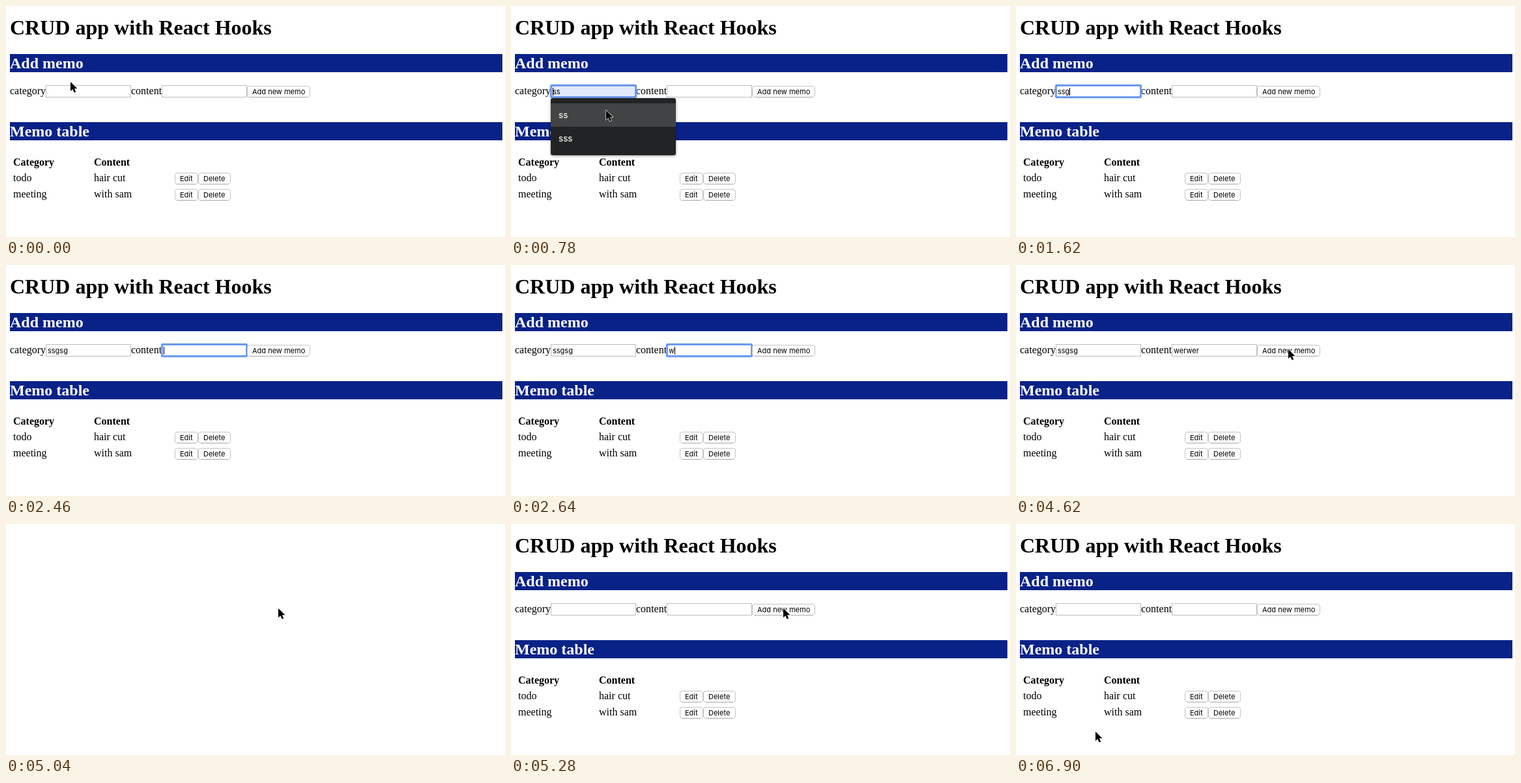
An HTML page that plays this animation: 766 by 356 pixels, repeating every 6.96 s.

```html
<!DOCTYPE html>
<html lang="en">
<head>
<meta charset="utf-8">
<title>CRUD app</title>
<style>
  html, body { margin: 0; width: 100%; height: 100%; overflow: hidden; background: #fff; }
  svg { display: block; width: 766px; height: 356px; }
  text { white-space: pre; }
  .serif { font: 16px "Liberation Serif", serif; }
  .bold { font-weight: 700; }
  .h1 { font-size: 32px; }
  .h2 { font-size: 24px; fill: #fff; }
  .ui { font: 11px Inter, sans-serif; }
  .bar { fill: #092287; }
  .field { fill: #fff; stroke: #bdbdbd; }
  .ring { fill: none; stroke: #5b8ff0; stroke-width: 2.5; }
  .glow { fill: none; stroke: #a9c5f8; stroke-width: 1; }
  .button { fill: #fff; stroke: #c4c4c4; }
  .edge { stroke: #a8a8a8; }
  .pressed .button { fill: #3f86f4; stroke: #2f6fe0; }
  .pressed .ui { fill: #fff; }
  .pressed .edge { stroke: #2a5fc4; }
  .item { font: 600 13px Inter, sans-serif; fill: #dedede; }
  #menu { filter: drop-shadow(0 1px 2px #0006); }
</style>
</head>
<body>
<svg viewBox="0 0 766 356">
  <g id="page">
    <text class="serif bold h1" x="6" y="44">CRUD app with React Hooks</text>
    <rect class="bar" x="6" y="74" width="756" height="28"/>
    <text class="serif bold h2" x="6" y="96">Add memo</text>
    <text class="serif" x="6" y="136">category</text>
    <text class="serif" x="192" y="136">content</text>
    <rect class="bar" x="6" y="179" width="756" height="28"/>
    <text class="serif bold h2" x="6" y="201">Memo table</text>
    <text class="serif bold" x="11" y="246">Category</text>
    <text class="serif bold" x="135" y="246">Content</text>
    <text class="serif" x="11" y="270">todo</text>
    <text class="serif" x="135" y="270">hair cut</text>
    <text class="serif" x="11" y="295">meeting</text>
    <text class="serif" x="135" y="295">with sam</text>
    <g id="form"></g>
    <g id="menu">
      <rect x="61" y="142" width="192" height="88" rx="3" fill="#222324"/>
      <rect id="hover" x="61" y="150" width="192" height="36" fill="#424344"/>
      <text class="item" x="73" y="173">ss</text>
      <text class="item" x="73" y="209">sss</text>
    </g>
  </g>
  <path id="cursor" d="M0 0V14.2L3.3 11.2L5.7 16.6L8.2 15.5L5.9 10.2H10.4Z" fill="#000" stroke="#fff" stroke-width="1.2" paint-order="stroke"/>
</svg>
<script>
const LOOP = 6960, STEP = 60;
const $ = id => document.getElementById(id);
const form = $('form');

function add(parent, tag, attrs, text = '') {
  const el = document.createElementNS('http://www.w3.org/2000/svg', tag);
  for (const key in attrs) el.setAttribute(key, attrs[key]);
  el.textContent = text;
  parent.append(el);
  return el;
}

const show = (el, on) => el.setAttribute('visibility', on ? 'inherit' : 'hidden');

function button(x, y, width, label) {
  const g = add(form, 'g', {});
  add(g, 'rect', { class: 'button', x: x + .5, y: y + .5, width: width - 1, height: 17, rx: 3.5 });
  add(g, 'path', { class: 'edge', d: `M${x + 4} ${y + 17.5}h${width - 8}` });
  add(g, 'text', { class: 'ui', x: x + 8, y: y + 13 }, label);
  return g;
}

function field(x) {
  const box = add(form, 'rect', { class: 'field', x: x + .5, y: 122.5, width: 130, height: 18 });
  const focus = add(form, 'g', {});
  add(focus, 'rect', { class: 'glow', x: x - 1, y: 121, width: 133, height: 21, rx: 2 });
  add(focus, 'rect', { class: 'ring', x: x + .5, y: 122.5, width: 130, height: 18, rx: 1 });
  const text = add(form, 'text', { class: 'ui', x: x + 3, y: 136 });
  const caret = add(form, 'rect', { y: 126, width: 1, height: 12 });
  return { x, box, focus, text, caret };
}

const category = field(61), content = field(239);
const addButton = button(370, 123, 97, 'Add new memo');
for (const y of [257, 282]) {
  button(259, y, 36, 'Edit');
  button(295, y, 50, 'Delete');
}

// Typed values as [time, text]
const categoryKeys = [[0, ''], [960, 'ss'], [1560, 'ssg'], [1800, 'ssgs'], [1980, 'ssgsg'], [5040, '']];
const contentKeys = [[0, ''], [2580, 'w'], [2760, 'we'], [2940, 'wer'], [3000, 'werw'], [3120, 'werwer'], [5040, '']];
// Pointer path as [time, x, y]
const path = [
  [0, 99, 117], [240, 112, 131], [420, 112, 131], [720, 146, 161], [3900, 146, 161],
  [4380, 418, 130], [6720, 418, 130], [6840, 200, 290], [6900, 122, 320]
];

const lastKey = (keys, t) => keys.filter(k => k[0] <= t).pop();

function pointer(t) {
  const i = path.findIndex(p => p[0] > t);
  if (i < 0) return path[path.length - 1].slice(1);
  const [t0, x0, y0] = path[i - 1], [t1, x1, y1] = path[i];
  const u = (t - t0) / (t1 - t0), k = u * u * (3 - 2 * u);
  return [x0 + (x1 - x0) * k, y0 + (y1 - y0) * k];
}

function drawField(f, keys, t, from, to, preview) {
  const [typedAt, value] = lastKey(keys, t);
  const focused = t >= from && t < to;
  f.text.textContent = preview || value;
  f.box.style.fill = preview || (value === 'ss' && focused) ? '#e1eafb' : '';
  show(f.focus, focused);
  show(f.caret, focused && (t - Math.max(typedAt, from)) % 1000 < 500);
  const width = value ? f.text.getComputedTextLength() : 0;
  f.caret.setAttribute('x', f.x + 3 + Math.round(width));
}

function render(t) {
  const hover = t >= 600 && t < 960;
  drawField(category, categoryKeys, t, 300, 2280, hover ? 'ss' : '');
  drawField(content, contentKeys, t, 2280, 4500, '');
  show($('menu'), t >= 420 && t < 960);
  show($('hover'), hover);
  addButton.setAttribute('class', t >= 4500 && t < 4620 ? 'pressed' : '');
  show($('page'), t < 5040 || t >= 5280);
  show($('cursor'), t < 1500 || t >= 3900);
  $('cursor').setAttribute('transform', `translate(${pointer(t)})`);
}

const start = performance.now();
function tick() {
  const t = (performance.now() - start) % LOOP;
  render(Math.floor(t / STEP) * STEP);
  requestAnimationFrame(tick);
}
tick();
</script>
</body>
</html>
```
